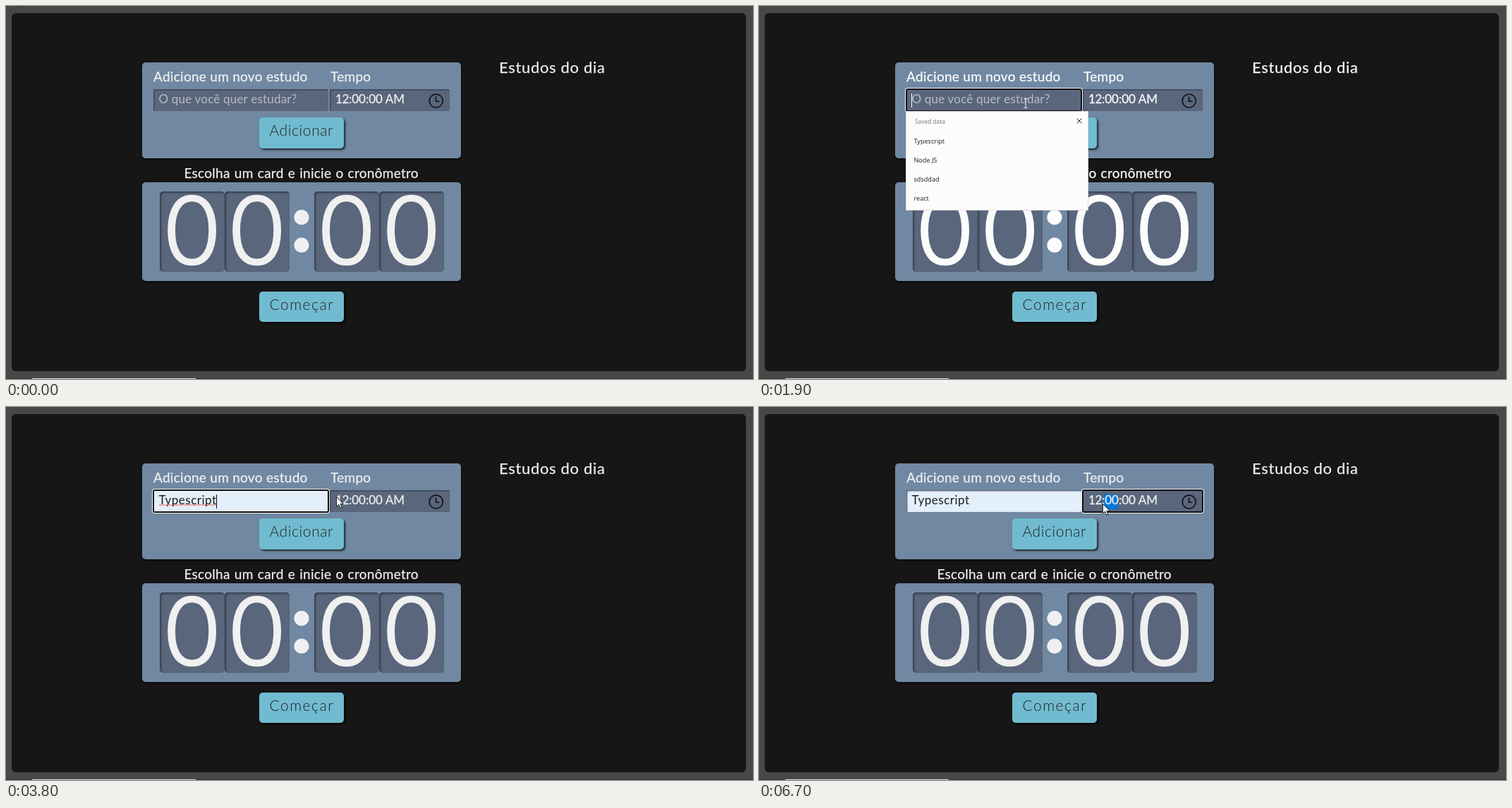
These frames come from a looping animation (1059x529 px, 8000 ms). An HTML page:

```html
<!DOCTYPE html>
<html lang="pt">
<head>
<meta charset="utf-8">
<title>Estudos do dia</title>
<style>
html, body { margin: 0; width: 100%; height: 100%; overflow: hidden; background: #484848; }
#stage { position: relative; width: 1059px; height: 529px; overflow: hidden; --ink: #f0f0f0; }
#stage div, svg { position: absolute; box-sizing: border-box; }
svg { left: 0; top: 0; }
.page { background: #161616; border-radius: 6px; }
.panel { background: #7088a2; border-radius: 5px; box-shadow: 1px 2px 2px #0a0a0a; }
.field { background: #5a667c; border-radius: 2px; box-shadow: inset 1px 1px 2px #343c4a; }
.digit { background: #5a667c; border-radius: 5px; box-shadow: inset 1.5px 1.5px 3px #2d3441; }
.button { background: #71bbd0; border-radius: 5px; box-shadow: 2px 2px 3px rgba(0, 0, 0, .75); }
.filled { background: #e4effc; }
.focus { box-shadow: inset 0 0 0 1px #101010, 0 0 0 1px #101010, 0 0 0 2px #f5f5f5; }
text { font-family: Lato, "Open Sans", sans-serif; white-space: pre; }
.ink { fill: var(--ink); }
.label, .title, .time { stroke: var(--ink); stroke-width: .25px; }
.label { font-size: 19px; letter-spacing: .28px; }
.title { font-size: 22px; letter-spacing: .68px; }
.input { font-size: 17px; letter-spacing: .2px; }
.time { font-size: 17px; }
.action { font-size: 21px; font-weight: 300; fill: #222; }
/* a thin stroke in the tile colour slims the numeral */
.big { font: 137.5px Inter, "Noto Sans", sans-serif; text-anchor: middle; stroke: #5a667c; stroke-width: 1.5px; }
.small { font: 9.1px "Open Sans", "Noto Sans", sans-serif; fill: #222; }
</style>
</head>
<body>
<div id="stage">
  <div id="boxes"></div>
  <svg width="1059" height="529" viewBox="0 0 1059 529">
    <path d="M0 528.5H1059" stroke="#2e2e2e"/>
    <path d="M37 528.5H269" stroke="#dcdcdc"/>
    <rect id="speck" x="16" y="0" width="2" height="1" fill="#111"/>

    <text class="ink title" x="699" y="95">Estudos do dia</text>
    <text class="ink label" x="209" y="107">Adicione um novo estudo</text>
    <text class="ink label" x="460" y="107">Tempo</text>
    <text class="ink label" x="252.5" y="244" style="word-spacing:1px">Escolha um card e inicie o cronômetro</text>
    <text class="action" x="373.5" y="184" style="letter-spacing:.6px">Adicionar</text>
    <text class="action" x="373.5" y="431" style="letter-spacing:1.5px">Começar</text>

    <g id="digits"></g>
    <g class="ink"><circle cx="419" cy="299.7" r="10.6"/><circle cx="419" cy="339.2" r="10.6"/></g>

    <text id="hint" class="input" x="216.5" y="138" fill="#b6bac3">O que você quer estudar?</text>
    <text id="value" class="input" x="216.5" y="138" fill="#1c1c1c" style="letter-spacing:.5px">Typescript</text>
    <path id="squiggle" fill="none" stroke="#e8453c" stroke-width=".9"/>
    <path id="caret" stroke-width="1"/>

    <rect id="mark" y="124" width="21" height="21" fill="#0078d7"/>
    <text id="hour" class="ink time" x="467" y="138" style="letter-spacing:-.4px">12</text>
    <text id="rest" class="ink time" y="138">:00:00 AM</text>
    <g fill="none" stroke="#0c0c0c" stroke-width="1.6">
      <circle cx="609.7" cy="134.5" r="9.5"/><path d="M609.5 128.5V135.2H614.5"/>
    </g>

    <g id="list">
      <rect x="208.5" y="149.5" width="258" height="140" fill="#fcfcfc" stroke="#dcdcdc"/>
      <text class="small" x="221" y="166.5" style="font-size:8.4px;fill:#777">Saved data</text>
      <path d="M450.5 159.5l7 7m0 -7l-7 7" stroke="#222" stroke-width="1"/>
    </g>

    <g id="tip">
      <rect x="495.5" y="150.5" width="315" height="18" fill="#fdfdfd" stroke="#6f6f6f"/>
      <text class="small" x="501" y="163.3">Please enter a valid value. The field is incomplete or has an invalid date.</text>
    </g>

    <path id="arrow" d="M.5 .5V14L3.6 11.2L5.8 16.2L8 15.2L5.9 10.4H10.2Z" fill="#fff" stroke="#111" stroke-width=".9"/>
    <path id="beam" d="M-3 -6.5H-1L0 -5.5L1 -6.5H3M0 -5.5V5.5M-3 6.5H-1L0 5.5L1 6.5H3" fill="none" stroke="#e8e8e8" stroke-width="1.1"/>
  </svg>
</div>
<script>
const LOOP = 8000, TICK = 100;
const $ = id => document.getElementById(id);

function box(kind, x, y, w, h) {
  const el = document.createElement('div');
  el.className = kind;
  el.style.cssText = `left:${x}px;top:${y}px;width:${w}px;height:${h}px`;
  $('boxes').append(el);
  return el;
}

function label(parent, kind, x, y, words) {
  const el = document.createElementNS('http://www.w3.org/2000/svg', 'text');
  el.setAttribute('class', kind);
  el.setAttribute('x', x);
  el.setAttribute('y', y);
  el.textContent = words;
  $(parent).append(el);
}

box('page', 8, 10, 1041, 508);
box('panel', 192.7, 79.6, 452.3, 136.8);
box('panel', 192.7, 249.6, 452.3, 140.8);
const study = box('field', 209, 118, 247.5, 31);
const clock = box('field', 459, 118, 170, 31);
box('button', 358.7, 157.8, 120.6, 44.4);
box('button', 358.7, 404.7, 120.6, 43.8);
for (const x of [218, 310, 437, 529]) {
  box('digit', x, 263, 91.5, 114);
  label('digits', 'ink big', x + 45.7, 368, '0');
}
['Typescript', 'Node JS', 'sdsddad', 'react'].forEach((word, i) =>
  label('list', 'small', 219.5, 194.5 + i * 27.3, word));
$('squiggle').setAttribute('d', 'M217 139.6' + 'l1.5 -1.3l1.5 1.3'.repeat(27));

// Pointer: time, x, y
const path = [
  [500, 26, 0], [700, 400, 60], [900, 830, 150], [1300, 448, 420], [1400, 448, 420],
  [1700, 378, 138], [2200, 378, 138], [2400, 325, 191], [2800, 325, 191],
  [3100, 496, 135], [3200, 496, 135], [3800, 468, 127], [4100, 482, 134], [4300, 487, 137]
];

function pointer(t) {
  const next = path.findIndex(p => p[0] > t);
  if (next < 0) return path[path.length - 1].slice(1);
  const a = path[Math.max(next - 1, 0)], b = path[next];
  const k = Math.max(0, (t - a[0]) / (b[0] - a[0] || 1));
  return [1, 2].map(i => Math.round(a[i] + (b[i] - a[i]) * k));
}

const show = (id, on) => { $(id).style.display = on ? '' : 'none'; };

function draw(ms) {
  const t = Math.floor(ms / TICK) * TICK;
  const during = (from, to) => t >= from && t < to;
  const filled = t >= 2400, typing = during(1900, 4000), timing = t >= 4000;
  const zeroHour = during(5100, 6700), minutes = t >= 6700;

  $('stage').style.setProperty('--ink',
    during(1900, 2600) ? '#fcfcfc' : during(5500, 6700) ? '#f5f5f5' : '#f0f0f0');
  study.className = 'field' + (filled ? ' filled' : '') + (typing ? ' focus' : '');
  clock.className = 'field' + (timing ? ' focus' : '');

  show('speck', t < 200);
  show('hint', !filled);
  show('value', filled);
  show('squiggle', during(2600, 4000));
  show('caret', during(1900, 2400) || during(2600, 3100) || during(3600, 4000));
  $('caret').setAttribute('d', filled ? 'M298.5 124V144' : 'M216.5 124V144');
  $('caret').setAttribute('stroke', filled ? '#111' : '#fff');
  show('list', during(1900, 2600));
  show('tip', during(5500, 6700));

  show('mark', timing);
  $('mark').setAttribute('x', minutes ? 488 : 467);
  $('hour').textContent = zeroHour ? '00' : '12';
  $('rest').setAttribute('x', zeroHour ? 488 : 486);

  const [x, y] = pointer(t), inText = during(1700, 2300);
  show('beam', inText);
  show('arrow', t >= 500 && !inText);
  $(inText ? 'beam' : 'arrow').setAttribute('transform', `translate(${x} ${y})`);
}

let start;
function frame(now) {
  start ??= now;
  draw((now - start) % LOOP);
  requestAnimationFrame(frame);
}
draw(0);
requestAnimationFrame(frame);
</script>
</body>
</html>
```
